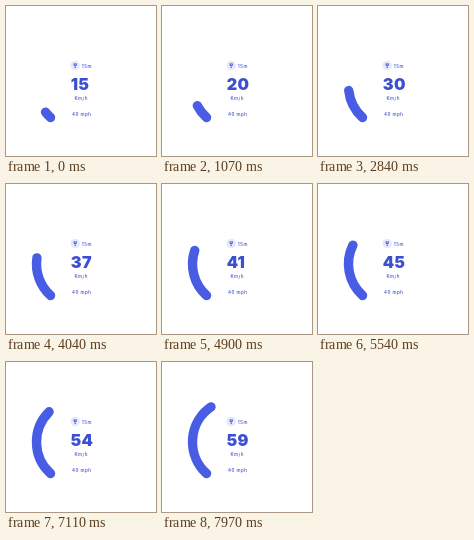
Write an HTML page that moves like this. It is 150 px wide and 150 px high and loops after 8 s.

```html
<!DOCTYPE html>
<html lang="en">
<head>
<meta charset="utf-8">
<title>Speedometer</title>
<style>
  html, body { margin: 0; width: 100%; height: 100%; overflow: hidden; background: #fff; }
  svg { display: block; width: 100vw; height: 100vh; }
  text { font-family: Inter, "Liberation Sans", sans-serif; fill: #3b4fd0; }
  .small { font-size: 4.5px; font-weight: 500; letter-spacing: .5px; }
  #speed { font-size: 16.2px; font-weight: 900; letter-spacing: .3px; }
  #arc { fill: none; stroke: #485ce4; stroke-width: 9.4; stroke-linecap: round; }
  #dots { fill: #e2e5f6; }
</style>
</head>
<body>
<svg viewBox="0 0 150 150">
  <g id="dots"></g>
  <path id="arc"/>
  <circle cx="69.2" cy="59.6" r="4.8" fill="#e6e9fb"/>
  <path d="M67.4 57.6h3.6l-.4 1.8-1 1.2h-.8l-1-1.2zM68.5 61.2h1.4v.9h-1.4z" fill="#3b4fd0"/>
  <circle cx="69.2" cy="58.7" r=".6" fill="#e6e9fb"/>
  <text class="small" x="75.8" y="61.5">15m</text>
  <text id="speed" x="64.8" y="83.6"></text>
  <text class="small" x="75.2" y="94.2" text-anchor="middle">Km/h</text>
  <text class="small" x="75.8" y="109.8" text-anchor="middle">40 mph</text>
</svg>
<script>
  const LOOP = 8000, HOLD = 200;
  const DIAL = { x: 73, y: 80, r: 42.5, start: 132 };
  const RING = { x: 74.5, y: 79.5, r: 33.6, start: 140, step: 10, count: 27 };
  const arc = document.getElementById('arc');
  const speed = document.getElementById('speed');

  function polar({ x, y, r }, deg) {
    const a = deg * Math.PI / 180;
    return [x + r * Math.cos(a), y + r * Math.sin(a)].map(n => n.toFixed(2));
  }

  document.getElementById('dots').innerHTML = Array.from({ length: RING.count }, (_, i) => {
    const [x, y] = polar(RING, RING.start + i * RING.step);
    return `<circle cx="${x}" cy="${y}" r=".45"/>`;
  }).join('');

  function draw(t) {
    const s = Math.max(0, t - HOLD) / 1000;
    const { r, start } = DIAL;
    const end = 142 + 12.05 * s;
    arc.setAttribute('d', `M${polar(DIAL, start)}A${r} ${r} 0 0 1 ${polar(DIAL, end)}`);
    speed.textContent = Math.floor(15.3 + 5.66 * s);
  }

  function tick() {
    draw(performance.now() % LOOP);
    requestAnimationFrame(tick);
  }
  tick();
</script>
</body>
</html>
```
